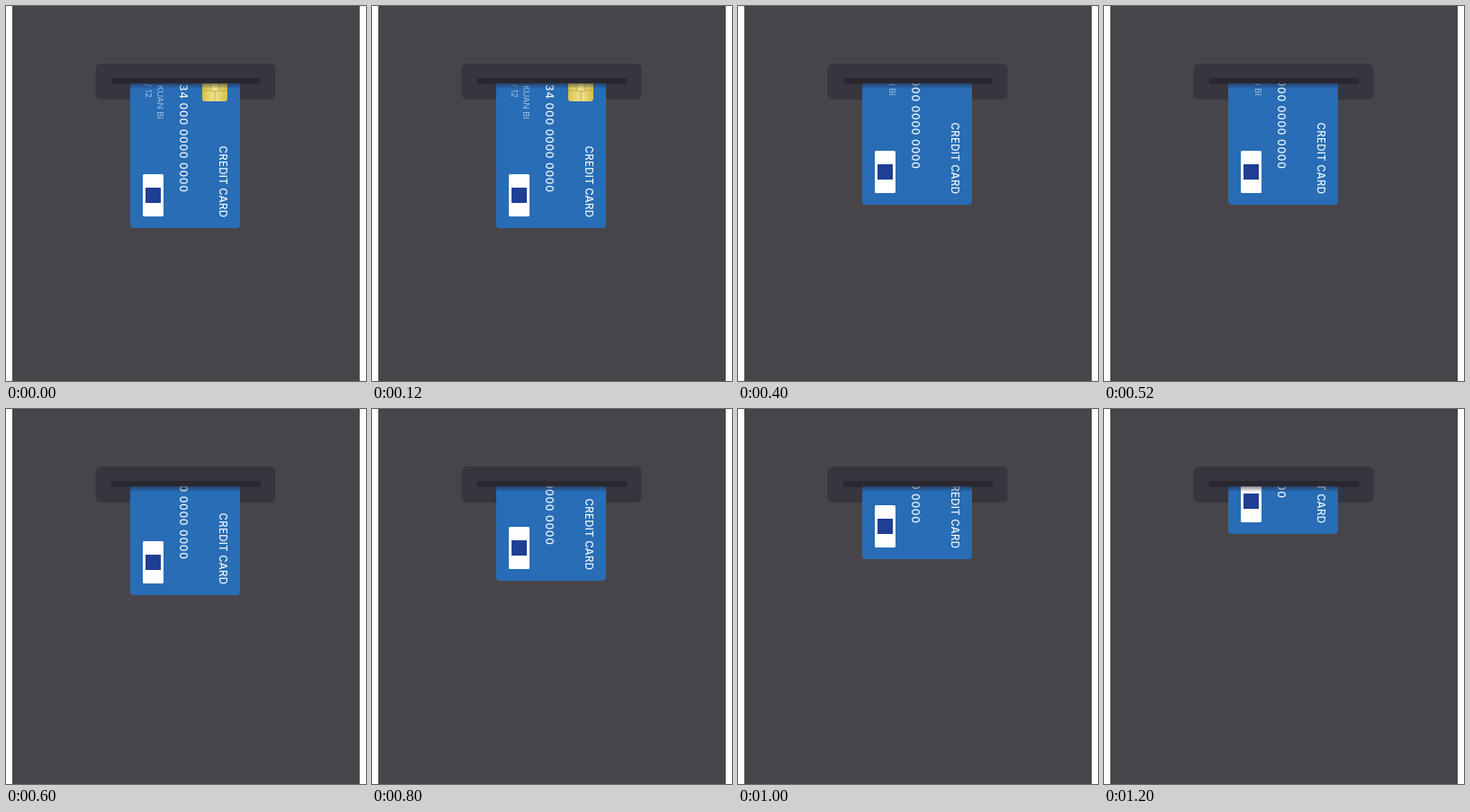
Write an HTML page with a canvas that moves like this. It is 400 px wide and 417 px high and loops after 1.4 s.

```html
<!DOCTYPE html>
<html lang="en">
<head>
<meta charset="utf-8">
<title>Card slot</title>
<style>
  html, body { margin: 0; width: 100%; height: 100%; overflow: hidden; background: #fff; }
  canvas { display: block; width: 400px; height: 417px; }
</style>
</head>
<body>
<canvas id="stage" width="400" height="417"></canvas>
<script>
const ctx = document.getElementById('stage').getContext('2d');
const STEP = 200;
const TRAVEL = [0, 14, 26, 40, 56, 80, 108];
const CARD = { x: 138, w: 122, h: 200, bottom: 247, mouth: 86 };

function box(x, y, w, h, r, fill) {
  ctx.fillStyle = fill;
  ctx.beginPath();
  ctx.roundRect(x, y, w, h, r);
  ctx.fill();
}

// Text reading downwards; x is the baseline, y the lower end.
function label(text, x, y, size, weight, spacing, color) {
  ctx.save();
  ctx.translate(x, y);
  ctx.rotate(Math.PI / 2);
  ctx.font = `${weight} ${size}px Inter, sans-serif`;
  ctx.letterSpacing = spacing + 'px';
  ctx.textAlign = 'right';
  ctx.textBaseline = 'alphabetic';
  ctx.fillStyle = color;
  ctx.fillText(text, spacing, 0);
  ctx.restore();
}

function chip(x, y) {
  const gold = ctx.createLinearGradient(x, 0, x + 28, 0);
  gold.addColorStop(0, '#d9c04c');
  gold.addColorStop(0.5, '#f0e48c');
  gold.addColorStop(1, '#d6bd48');
  box(x, y, 28, 36, 3, gold);
  ctx.strokeStyle = '#a8924a';
  ctx.lineWidth = 0.7;
  ctx.beginPath();
  ctx.roundRect(x + 9, y + 11, 10, 14, 3);
  for (const dy of [12, 24]) {
    ctx.moveTo(x, y + dy);
    ctx.lineTo(x + 9, y + dy);
    ctx.moveTo(x + 19, y + dy);
    ctx.lineTo(x + 28, y + dy);
  }
  ctx.moveTo(x + 14, y + 25);
  ctx.lineTo(x + 14, y + 36);
  ctx.stroke();
}

function card(bottom) {
  const { x, w, h, mouth } = CARD;
  ctx.save();
  ctx.beginPath();
  ctx.rect(x, mouth, w, 417);
  ctx.clip();

  box(x, bottom - h, w, h, 4, '#286db5');
  chip(218, bottom - 177);
  label('CREDIT CARD', 236.5, bottom - 12, 11.5, 500, 0.25, '#f4f8fc');
  label('1234 000 0000 0000', 193.3, bottom - 40, 12, 500, 0.65, '#f4f8fc');
  label('KUAN BI', 168.3, bottom - 121, 9.5, 300, 0, '#c3d7ec');
  label('11 / 12', 154.8, bottom - 145, 9.5, 300, 0, '#c3d7ec');
  box(152, bottom - 60, 23, 47, 1.5, '#fff');
  box(155, bottom - 45, 17, 17, 0, '#1f3f95');

  const shade = ctx.createLinearGradient(0, mouth, 0, mouth + 6);
  shade.addColorStop(0, 'rgba(32, 30, 45, 0.55)');
  shade.addColorStop(1, 'rgba(32, 30, 45, 0)');
  ctx.fillStyle = shade;
  ctx.fillRect(x, mouth, w, 6);
  ctx.restore();
}

function draw(ms) {
  const step = Math.floor(ms / STEP) % TRAVEL.length;
  ctx.fillStyle = '#fff';
  ctx.fillRect(0, 0, 400, 417);
  ctx.fillStyle = '#48454a';
  ctx.fillRect(7, 0, 386, 417);
  box(99.5, 64, 200, 40, 6, '#37353e');
  box(116.5, 80, 167, 7, 3.5, '#292730');
  card(CARD.bottom - TRAVEL[step]);
}

let start;
function tick(now) {
  start ??= now;
  draw(Math.max(0, now - start));
  requestAnimationFrame(tick);
}
draw(0);
requestAnimationFrame(tick);
</script>
</body>
</html>
```
